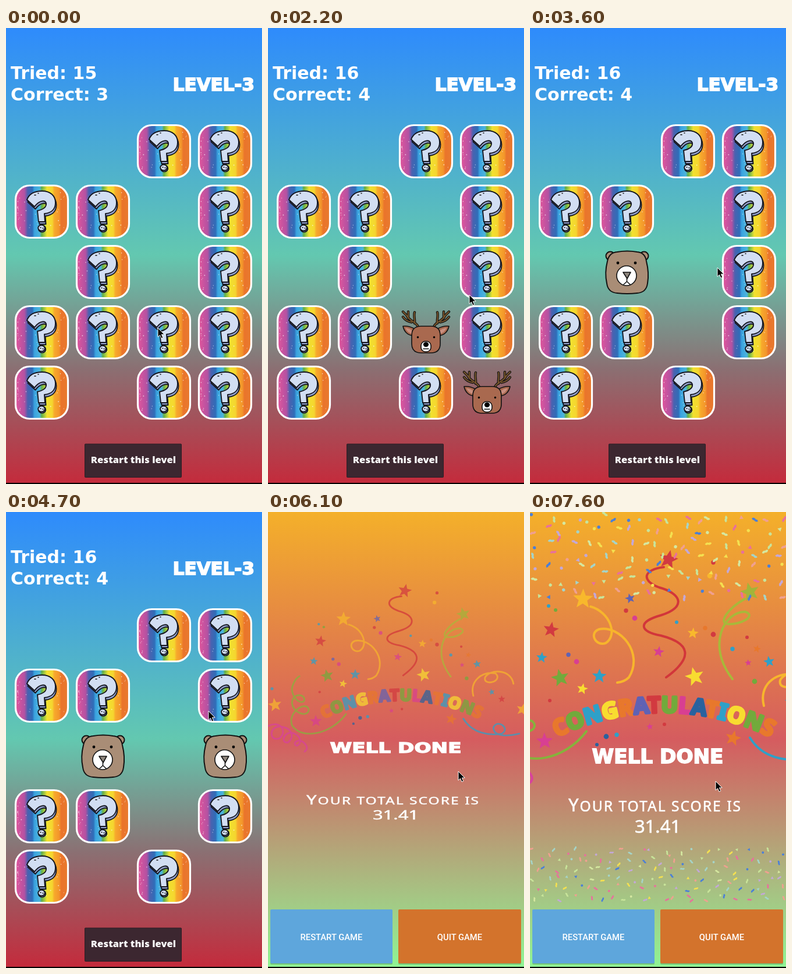
Recreate the animation shown at these times as an HTML page. Size 440 by 786 pixels, loop 7.7 s.

```html
<!DOCTYPE html>
<html lang="en">
<head>
<meta charset="utf-8">
<title>Memory game</title>
<style>
  html, body { margin: 0; width: 100%; height: 100%; overflow: hidden; background: #000; }
  svg { display: block; width: 100vw; height: 100vh; }
  .display { font: bold 30px "DejaVu Sans", sans-serif; fill: #fff; }
  .block { font: bold 31px "DejaVu Sans", sans-serif; fill: #fff; stroke: #fff; stroke-width: 1.8; }
  .label { font: 800 16.6px "Open Sans", sans-serif; fill: #fff; }
  .score { font: 500 31px "Noto Sans", sans-serif; fill: #fff; stroke: #fff; stroke-width: .6; }
  .button { font: 500 14.8px Roboto, sans-serif; fill: #fff; }
  .arc { font: bold 38.5px "Noto Sans", sans-serif; stroke-width: 4.5; stroke-linejoin: round; }
  .ribbon { fill: none; stroke-width: 4; stroke-linecap: round; }
  .ink { fill: none; stroke: #111; stroke-width: 1.6; stroke-linejoin: round; stroke-linecap: round; }
</style>
</head>
<body>
<svg viewBox="0 0 440 786" preserveAspectRatio="none">
  <defs>
    <linearGradient id="gameSky" x2="0" y2="1">
      <stop stop-color="#2e8bfc"/><stop offset=".5" stop-color="#63c8b0"/>
      <stop offset=".75" stop-color="#8b6f72"/><stop offset="1" stop-color="#c42b3c"/>
    </linearGradient>
    <linearGradient id="endSky" x2="0" y2="1">
      <stop stop-color="#f4b02a"/><stop offset=".5" stop-color="#d55c5f"/><stop offset="1" stop-color="#90f494"/>
    </linearGradient>
    <linearGradient id="rainbow">
      <stop offset=".02" stop-color="#dc559c"/><stop offset=".17" stop-color="#b352a2"/>
      <stop offset=".23" stop-color="#4a62b0"/><stop offset=".32" stop-color="#2f6db8"/>
      <stop offset=".36" stop-color="#3aa3e0"/><stop offset=".46" stop-color="#4cb4dc"/>
      <stop offset=".5" stop-color="#63b04a"/><stop offset=".56" stop-color="#b5cf3c"/>
      <stop offset=".6" stop-color="#f2e12f"/><stop offset=".7" stop-color="#f5d52f"/>
      <stop offset=".74" stop-color="#f7a92c"/><stop offset=".83" stop-color="#f3962b"/>
      <stop offset=".87" stop-color="#ea742b"/><stop offset="1" stop-color="#e87a2e"/>
    </linearGradient>
    <clipPath id="topBand"><rect width="440" height="156"/></clipPath>
    <clipPath id="lowBand"><rect y="576" width="440" height="98"/></clipPath>
    <path id="arch" d="M20 402A420 420 0 0 1 440 402"/>
    <path id="hook" d="M21 26C25 15 35 11 47 11C61 11 70 19 70 31C70 43 62 49 51 50L52 64L41 64L39 45C48 43 55 39 54 32C52 26 42 27 34 38Z"/>

    <g id="back">
      <rect x="1.5" y="1.5" width="90" height="90" rx="24" fill="url(#rainbow)" stroke="#fff" stroke-width="3.2"/>
      <g id="specks" fill="#fff"></g>
      <g stroke="#15161f" stroke-width="1.9" stroke-linejoin="round">
        <use href="#hook" x="1.5" y="4" fill="#95a3ce"/>
        <use href="#hook" fill="#d2def3"/>
        <ellipse cx="47" cy="76" rx="6.2" ry="5.6" fill="#95a3ce"/>
        <ellipse cx="46" cy="74.5" rx="5.8" ry="5" fill="#d2def3"/>
      </g>
      <path class="ink" d="M34 18h2M40 15h1M44 74h1M48 75h1"/>
    </g>

    <g id="deer">
      <g id="antler">
        <path id="branch" class="ink" style="stroke-width:4.4" d="M33 37C30 28 18 28 13 17L7 11M22 29C16 28 11 26 7 20M27 31C28 24 25 18 27 12M16 22L16 11"/>
        <path class="ink" style="stroke:#75542c;stroke-width:2.2" d="M33 37C30 28 18 28 13 17L7 11M22 29C16 28 11 26 7 20M27 31C28 24 25 18 27 12M16 22L16 11"/>
        <path class="ink" style="fill:#a9694f" d="M26 40C20 37 13 35 7 36C9 46 16 52 24 52Z"/>
        <path d="M22 43C18 40 14 39 11 39C14 45 18 48 22 49Z" fill="#c98f80"/>
      </g>
      <use href="#antler" transform="matrix(-1 0 0 1 93 0)"/>
      <path class="ink" style="fill:#a9694f" d="M38 36H55Q71 36 71 52V66Q71 82 55 82H38Q22 82 22 66V52Q22 36 38 36Z"/>
      <circle cx="32.5" cy="55" r="1.8"/><circle cx="60.5" cy="55" r="1.8"/>
      <rect class="ink" style="fill:#fff" x="38" y="62" width="17" height="18" rx="7.5"/>
      <ellipse cx="46.5" cy="67.5" rx="4.6" ry="4.2"/>
      <path class="ink" d="M42 75H51"/>
    </g>

    <g id="bear">
      <g class="ink" style="stroke-width:2;fill:#a98d76">
        <circle cx="18" cy="19" r="7.5"/><circle cx="76" cy="19" r="7.5"/>
        <path d="M30 12Q47 9 64 12Q78 13 80 28Q85 48 82 66Q80 82 64 83Q47 85 30 83Q14 82 12 66Q8 48 13 28Q16 13 30 12Z"/>
      </g>
      <circle cx="31" cy="31" r="2.4"/><circle cx="61" cy="31" r="2.4"/>
      <circle class="ink" style="fill:#fff" cx="46" cy="53" r="17"/>
      <path class="ink" style="fill:#8d857d" d="M40 47H53L47 58Z"/>
      <path class="ink" d="M46.5 58V63M41 68L46.5 63L52 68"/>
    </g>
  </defs>

  <g id="game">
    <rect width="440" height="784" fill="url(#gameSky)"/>
    <text class="display" id="tried" x="8" y="88"></text>
    <text class="display" id="correct" x="8" y="125"></text>
    <text class="block" x="427" y="108" text-anchor="end">LEVEL-3</text>
    <g id="board"></g>
    <rect x="135.5" y="717" width="166" height="57.5" rx="1" fill="#3c2730" stroke="#2c1d24"/>
    <text class="label" x="219" y="750" text-anchor="middle">Restart this level</text>
  </g>

  <g id="end">
    <rect width="440" height="784" fill="url(#endSky)"/>
    <g id="party">
      <g class="ribbon">
        <path stroke="#d2363a" d="M230 95C195 99 190 118 222 130C262 141 268 165 225 178C185 189 187 206 225 213C275 226 282 250 234 285"/>
        <path stroke="#f7b52c" d="M104 163C137 172 152 212 130 226C112 232 101 208 119 202C155 195 196 243 170 285Q162 293 150 294"/>
        <path stroke="#a8b83a" d="M369 150C342 165 322 191 340 193C362 195 390 179 370 172C335 171 302 228 348 288"/>
        <path stroke="#f7b52c" d="M402 334C393 300 420 275 455 280C475 300 425 312 430 290C440 270 492 268 498 305"/>
        <path stroke="#2fa0c8" d="M378 389C400 425 440 430 470 425C492 413 460 388 450 410C450 435 490 430 512 425"/>
        <path stroke="#86b23c" d="M97 378C60 428-10 440-32 405C-44 372 4 344 8 368C5 388-32 374-32 350C-30 325 2 330-3 346C-14 358-40 330-30 308Q-24 292-14 287"/>
        <path stroke="#d8429d" d="M-92 408C-60 390-42 420-62 436C-88 446-88 404-58 408C-30 412-26 436-42 446C-62 448-50 416-28 424C-8 432-10 450-20 454C-34 450-18 434-4 446Q10 460-2 468"/>
      </g>
      <g id="stars"></g>
      <g id="dots"></g>
      <text class="arc" text-anchor="middle"><textPath id="banner" href="#arch" startOffset="50%"></textPath></text>
    </g>
    <g clip-path="url(#topBand)"><g id="topConfetti"></g></g>
    <g clip-path="url(#lowBand)"><g id="lowConfetti"></g></g>
    <text id="done" class="block" style="font-size:34.2px" x="219.5" y="433" text-anchor="middle">WELL DONE</text>
    <g id="total" class="score" text-anchor="middle">
      <text x="215" y="516" letter-spacing="2">Y<tspan font-size="24.6">OUR TOTAL SCORE IS</tspan></text>
      <text x="219.5" y="553">31.41</text>
    </g>
    <rect x="4" y="687" width="210" height="93" rx="2" fill="#0003"/>
    <rect x="224" y="687" width="211" height="93" rx="2" fill="#0003"/>
    <rect x="4" y="685" width="210" height="93" rx="2" fill="#5ea6dc"/>
    <rect x="224" y="685" width="211" height="93" rx="2" fill="#d3732c"/>
    <g class="button" text-anchor="middle">
      <text x="109" y="737.5">RESTART GAME</text>
      <text x="329.5" y="737.5">QUIT GAME</text>
    </g>
  </g>

  <rect y="784" width="440" height="2"/>
  <path id="cursor" d="M0 0V15.5L3.6 12.3L6 18L8.8 16.8L6.4 11.2H11.2Z" stroke="#fff" stroke-width="1"/>
</svg>

<script>
const LOOP = 7700, END_AT = 5100;
const $ = id => document.getElementById(id);

function add(parent, tag, attrs) {
  const node = document.createElementNS('http://www.w3.org/2000/svg', tag);
  for (const key in attrs) node.setAttribute(key, attrs[key]);
  return parent.appendChild(node);
}

function seeded(seed) {
  return () => (seed = (seed * 16807) % 2147483647) / 2147483647;
}

const clamp = v => Math.min(1, Math.max(0, v));
const ease = v => .5 - .5 * Math.cos(Math.PI * clamp(v));
const show = (node, on) => node.setAttribute('display', on ? 'inline' : 'none');

const RED = '#d23a40', ORANGE = '#e8782c', AMBER = '#f8b82c', YELLOW = '#f8dc30',
      GREEN = '#72aa3c', TEAL = '#2fa0c8', BLUE = '#2a629e', INDIGO = '#6062b4', PINK = '#d83f92';

// Card backs carry a light sprinkle, denser on the left.
const speck = seeded(41);
for (let i = 0; i < 46; i++) {
  add($('specks'), 'circle', {
    cx: 5 + 82 * speck() ** 1.7, cy: 13 + 68 * speck(), r: .5 + .4 * speck(), opacity: .75
  });
}

const layout = ['..??', '??.?', '.?.?', '????', '?.??'];
const cards = {};
layout.forEach((row, r) => [...row].forEach((cell, c) => {
  if (cell === '.') return;
  cards[`${c},${r}`] = add($('board'), 'use', { href: '#back', x: 15 + 105 * c, y: 166 + 104 * r });
}));

const turns = [
  { at: '2,3', face: '#deer', open: 300, gone: 2500 },
  { at: '3,4', face: '#deer', open: 1500, gone: 2500 },
  { at: '1,2', face: '#bear', open: 3000, gone: LOOP },
  { at: '3,2', face: '#bear', open: 4200, gone: LOOP }
];

// Celebration art
function starPath(x, y, r, tilt) {
  const points = Array.from({ length: 10 }, (_, i) => {
    const a = i * Math.PI / 5 - Math.PI / 2 + tilt, d = i % 2 ? r * .43 : r;
    return `${(x + d * Math.cos(a)).toFixed(1)} ${(y + d * Math.sin(a)).toFixed(1)}`;
  });
  return `M${points.join('L')}Z`;
}

[
  [238, 82, 17, RED], [91, 150, 18, AMBER], [378, 138, 17, '#a2b43a'], [36, 203, 14, RED],
  [20, 251, 10, TEAL], [172, 149, 9, INDIGO], [280, 209, 10, AMBER], [221, 241, 10, PINK],
  [283, 284, 17, YELLOW], [119, 283, 13, TEAL], [90, 305, 10, YELLOW], [52, 286, 16, GREEN],
  [25, 395, 15, PINK], [349, 390, 14, ORANGE], [411, 258, 10, TEAL], [206, 370, 6, PINK],
  [390, 236, 7, ORANGE], [375, 260, 6, PINK], [-73, 356, 17, AMBER], [520, 367, 16, AMBER],
  [470, 342, 9, RED], [446, 325, 8, TEAL]
].forEach(([x, y, r, fill], i) =>
  add($('stars'), 'path', { d: starPath(x, y, r, .25 * Math.sin(i * 2 + 1)), fill }));

[
  [44, 169, GREEN], [66, 246, INDIGO], [80, 258, PINK], [34, 325, RED], [165, 170, RED],
  [180, 183, PINK], [252, 190, TEAL], [301, 200, ORANGE], [315, 211, RED], [373, 216, RED],
  [348, 236, TEAL], [386, 292, GREEN], [231, 366, RED], [149, 384, TEAL], [131, 387, BLUE],
  [115, 401, BLUE], [315, 87, RED], [309, 110, AMBER], [32, 162, TEAL], [-80, 317, TEAL]
].forEach(([cx, cy, fill], i) => add($('dots'), 'circle', { cx, cy, r: 3 + i % 3 * .7, fill }));

const letterColors = [ORANGE, GREEN, TEAL, YELLOW, ORANGE, INDIGO, RED, GREEN, PINK, BLUE,
                      ORANGE, TEAL, YELLOW, GREEN, ORANGE];
[...'CONGRATULATIONS'].forEach((letter, i) => {
  add($('banner'), 'tspan', { fill: letterColors[i], stroke: letterColors[i] }).textContent = letter;
});

function scatter(layer, seed, top, cols, rows, pitchY, size) {
  const rand = seeded(seed), pitchX = 440 / cols;
  const colors = ['#e8709c', '#4a7fd8', '#c8e49a', '#f4e050', '#c3a8d8', '#a5d4c8', '#f0a090', '#d5e8a0'];
  for (let i = 0; i < cols * rows; i++) {
    const x = (i % cols + .1 + .8 * rand()) * pitchX;
    const y = top + (Math.floor(i / cols) + .1 + .8 * rand()) * pitchY;
    const fill = colors[Math.floor(rand() * colors.length)];
    const transform = `translate(${x.toFixed(1)} ${y.toFixed(1)}) rotate(${Math.floor(rand() * 180)}) scale(${size})`;
    const kind = rand();
    if (kind < .2) add(layer, 'circle', { r: 3, fill, transform });
    else if (kind < .35) add(layer, 'path', { d: 'M-4 3L0-4L4 3Z', fill, transform });
    else add(layer, 'path', { d: 'M-5-1Q-2-3 0 0T5 1', fill: 'none', stroke: fill, 'stroke-width': 4, transform });
  }
}
scatter($('topConfetti'), 77, 0, 19, 7, 21.5, .9);
scatter($('lowConfetti'), 913, 578, 24, 6, 15.6, .65);

// Pointer stops: time, x, y
const stops = [
  [0, 261, 517], [400, 262, 518], [1250, 357, 620], [1600, 357, 620], [2200, 346, 460],
  [2850, 168, 421], [3150, 168, 421], [3600, 322, 413], [3950, 368, 420], [4300, 368, 420],
  [4700, 348, 343], [5300, 335, 425], [6100, 327, 447], [7600, 319, 464], [LOOP, 319, 464]
];

function pointer(t) {
  const i = stops.findIndex(s => s[0] > t);
  const [t0, x0, y0] = stops[i - 1], [t1, x1, y1] = stops[i];
  const k = ease((t - t0) / (t1 - t0));
  return [x0 + (x1 - x0) * k, y0 + (y1 - y0) * k];
}

function stretch(node, top, s) {
  node.setAttribute('transform', `translate(0 ${top * (1 - s)}) scale(1 ${s})`);
}

function draw(t) {
  const ended = t >= END_AT;
  show($('game'), !ended);
  show($('end'), ended);
  $('cursor').setAttribute('transform', `translate(${pointer(t)})`);

  if (!ended) {
    const scored = t >= 2000;
    $('tried').textContent = `Tried: ${scored ? 16 : 15}`;
    $('correct').textContent = `Correct: ${scored ? 4 : 3}`;
    for (const { at, face, open, gone } of turns) {
      cards[at].setAttribute('href', t < open ? '#back' : face);
      show(cards[at], t < gone);
    }
    return;
  }

  const grow = Math.max(.001, ease((t - 5200) / 1400));
  $('party').setAttribute('transform', `translate(228 273) scale(${grow}) translate(-228 -273)`);
  $('party').setAttribute('opacity', grow);
  stretch($('done'), 370, grow);
  stretch($('total'), 473, grow);

  const fall = clamp((t - 6600) / 900);
  $('topConfetti').setAttribute('transform', `translate(0 ${-160 * (1 - fall)})`);
  $('lowConfetti').setAttribute('transform', `translate(0 ${-100 * (1 - fall)})`);
}

const start = performance.now();
function tick() {
  draw((performance.now() - start) % LOOP);
  requestAnimationFrame(tick);
}
tick();
</script>
</body>
</html>
```
